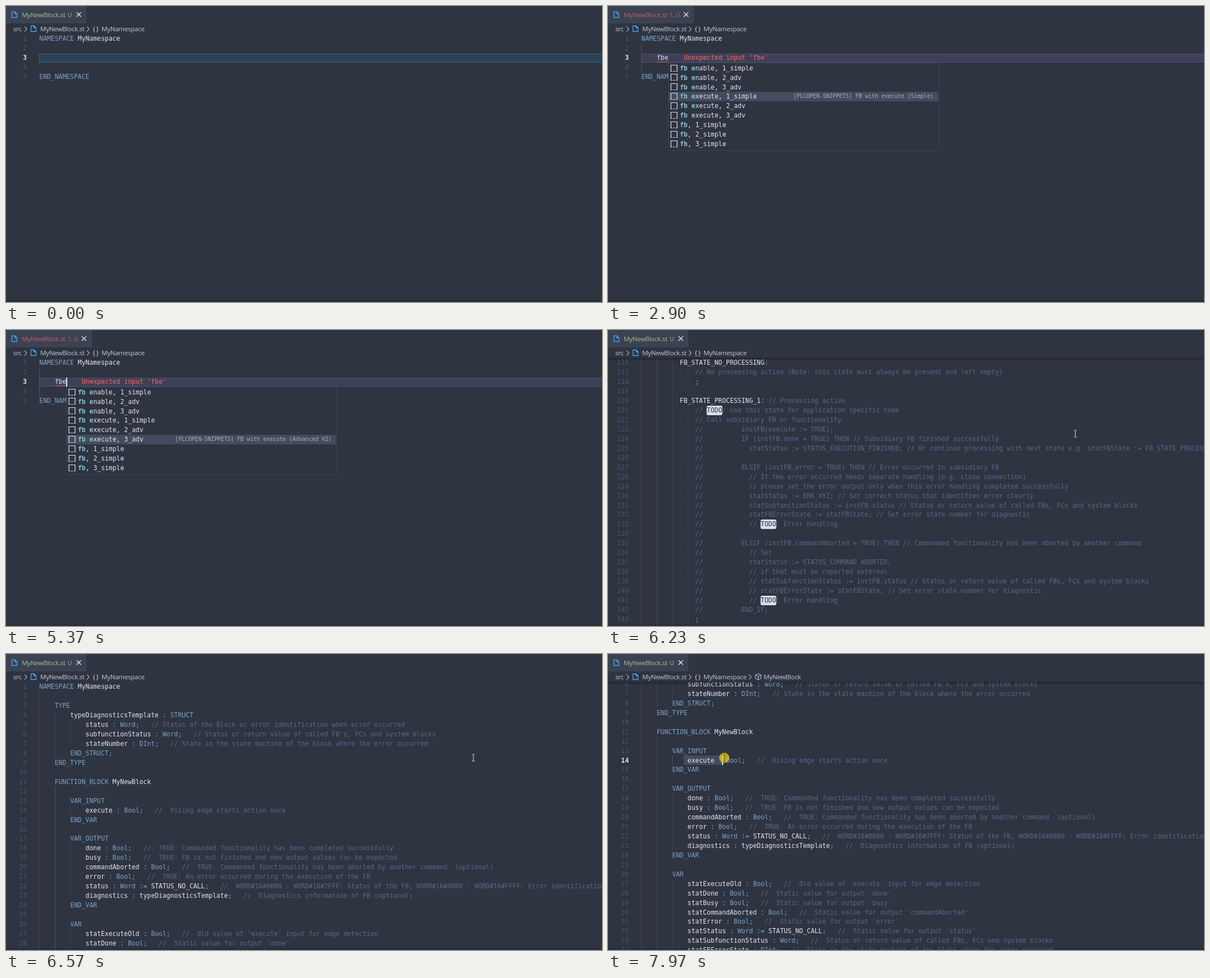
An HTML page with a canvas that plays this animation: 1061 px wide and 528 px high, repeating every 8000 ms.

```html
<!DOCTYPE html>
<html lang="en">
<head>
<meta charset="utf-8">
<title>Snippet completion</title>
<style>
html, body { margin: 0; width: 100%; height: 100%; overflow: hidden; background: #2e3440; }
canvas { display: block; }
</style>
</head>
<body>
<canvas id="stage" width="1061" height="528"></canvas>
<script>
const ctx = document.getElementById('stage').getContext('2d');
const W = 1061, H = 528, LOOP = 8000;
const LEFT = 59.3, TOP = 50, LINE = 16.94, CHAR = 6.857;
const MONO = '"DejaVu Sans Mono", monospace', UI = '"Open Sans", "Noto Sans", sans-serif';
const CODE = `11.39px ${MONO}`, BOLD = `bold ${CODE}`;
const C = {
  bg: '#2e3440', tab: '#3b4252', text: '#e2e7f0', key: '#7ca2c9', note: '#59678a', num: '#4a556d',
  guide: '#3d4454', active: '#4c566a', match: '#88c0d0', select: '#434c5e', ui: '#c3c9d5', icon: '#42a5f5'
};
const KEYWORDS = new Set(('NAMESPACE END_NAMESPACE TYPE END_TYPE STRUCT END_STRUCT FUNCTION_BLOCK END_FUNCTION_BLOCK ' +
  'VAR VAR_INPUT VAR_OUTPUT VAR_TEMP CONSTANT END_VAR IF THEN ELSE ELSIF END_IF CASE OF END_CASE AND OR NOT ' +
  'TRUE FALSE Word DInt Bool WORD').split(' '));

const head = `NAMESPACE MyNamespace

    TYPE
        typeDiagnosticsTemplate : STRUCT
            status : Word;   // Status of the Block or error identification when error occurred
            subfunctionStatus : Word;   // Status or return value of called FB's, FCs and system blocks
            stateNumber : DInt;   // State in the state machine of the block where the error occurred
        END_STRUCT;
    END_TYPE

    FUNCTION_BLOCK MyNewBlock

        VAR_INPUT
            execute : Bool;   //  Rising edge starts action once
        END_VAR

        VAR_OUTPUT
            done : Bool;   //  TRUE: Commanded functionality has been completed successfully
            busy : Bool;   //  TRUE: FB is not finished and new output values can be expected
            commandAborted : Bool;   //  TRUE: Commanded functionality has been aborted by another command  (optional)
            error : Bool;   //  TRUE: An error occurred during the execution of the FB
            status : Word := STATUS_NO_CALL;   //  WORD#16#0000 - WORD#16#7FFF: Status of the FB, WORD#16#8000 - WORD#16#FFFF: Error identification
            diagnostics : typeDiagnosticsTemplate;   //  Diagnostics information of FB (optional)
        END_VAR

        VAR
            statExecuteOld : Bool;   //  Old value of 'execute' input for edge detection
            statDone : Bool;   //  Static value for output 'done'
            statBusy : Bool;   //  Static value for output 'busy'
            statCommandAborted : Bool;   //  Static value for output 'commandAborted'
            statError : Bool;   //  Static value for output 'error'
            statStatus : Word := STATUS_NO_CALL;   //  Static value for output 'status'
            statSubfunctionStatus : Word;   //  Status or return value of called FBs, FCs and system blocks
            statFBErrorState : DInt;   //  State in the state machine of the block where the error occurred
            statFBState : DInt;   //  Current state of the state machine
            statDiagnostics : typeDiagnosticsTemplate;   //  Static value for output 'diagnostics'
        END_VAR

        VAR_TEMP
            tempExecute : Bool;   //  Temporary value of input 'execute'
        END_VAR

        VAR CONSTANT
            STATUS_EXECUTION_FINISHED : Word := WORD#16#0000;
            STATUS_NO_CALL : Word := WORD#16#7000;
            STATUS_FIRST_CALL : Word := WORD#16#7001;
            STATUS_SUBSEQUENT_CALL : Word := WORD#16#7002;
            STATUS_COMMAND_ABORTED : Word := WORD#16#8001;
            ERR_UNDEFINED_STATE : Word := WORD#16#8600;
            ERR_XYZ : Word := WORD#16#8601;
            FB_STATE_NO_PROCESSING : DInt := 0;
            FB_STATE_PROCESSING_1 : DInt := 1;
        END_VAR

        // Work with a temporary copy of the input
        tempExecute := execute;

        // Rising edge starts the processing
        IF (tempExecute = TRUE) AND (statExecuteOld = FALSE) THEN
            IF (statStatus = STATUS_NO_CALL) THEN
                // First call: initialize static values
                statDone := FALSE;
                statBusy := TRUE;
                statCommandAborted := FALSE;
                statError := FALSE;
                statStatus := STATUS_FIRST_CALL;
                statSubfunctionStatus := STATUS_EXECUTION_FINISHED;
                statFBErrorState := FB_STATE_NO_PROCESSING;
                statFBState := FB_STATE_PROCESSING_1;

                // Reset diagnostics
                statDiagnostics.status := STATUS_NO_CALL;
                statDiagnostics.stateNumber := FB_STATE_NO_PROCESSING;
            END_IF;

        ELSIF (statStatus = STATUS_FIRST_CALL) THEN
            // All further calls
            statStatus := STATUS_SUBSEQUENT_CALL;
        END_IF;

        // Falling edge resets the outputs
        IF (tempExecute = FALSE) AND (statBusy = FALSE) THEN
            statDone := FALSE;
            statError := FALSE;
            statCommandAborted := FALSE;
            statStatus := STATUS_NO_CALL;
            statFBState := FB_STATE_NO_PROCESSING;
        END_IF;

        statExecuteOld := tempExecute;

        // State machine
        CASE statFBState OF`.split('\n');

const tail = `          FB_STATE_NO_PROCESSING:
              // No processing active (Note: this state must always be present and left empty)
              ;

          FB_STATE_PROCESSING_1: // Processing active
              // TODO: Use this state for application specific code
              // Call subsidiary FB or functionality
              //          instFB(execute := TRUE);
              //          IF (instFB.done = TRUE) THEN // Subsidiary FB finished successfully
              //            statStatus := STATUS_EXECUTION_FINISHED; // Or continue processing with next state e.g. statFBState := FB_STATE_PROCESSING_2
              //
              //          ELSIF (instFB.error = TRUE) THEN // Error occurred in subsidiary FB
              //            // If the error occurred needs separate handling (e.g. close connection)
              //            // please set the error output only when this error handling completed successfully
              //            statStatus := ERR_XYZ; // Set correct status that identifies error clearly
              //            statSubfunctionStatus := instFB.status // Status or return value of called FBs, FCs and system blocks
              //            statFBErrorState := statFBState; // Set error state number for diagnostic
              //            // TODO: Error handling
              //
              //          ELSIF (instFB.commandAborted = TRUE) THEN // Commanded functionality has been aborted by another command
              //            // Set
              //            statStatus := STATUS_COMMAND_ABORTED;
              //            // if that must be reported external
              //            // statSubfunctionStatus := instFB.status // Status or return value of called FBs, FCs and system blocks
              //            // statFBErrorState := statFBState; // Set error state number for diagnostic
              //            // TODO: Error handling
              //          END_IF;
              ;

          ELSE // Undefined state
              statStatus := ERR_UNDEFINED_STATE;
              statFBErrorState := statFBState;
        END_CASE;

        // Write static values to outputs
        IF (statStatus = STATUS_EXECUTION_FINISHED) THEN
            statDone := TRUE;
            statBusy := FALSE;
        END_IF;

        done := statDone;
        busy := statBusy;
        commandAborted := statCommandAborted;
        error := statError;
        status := statStatus;
        diagnostics := statDiagnostics;

    END_FUNCTION_BLOCK

END_NAMESPACE`.split('\n');

const program = [...head, ...Array(115 - head.length).fill(''), ...tail];
const entries = ['fb enable, 1_simple', 'fb enable, 2_adv', 'fb enable, 3_adv', 'fb execute, 1_simple',
  'fb execute, 2_adv', 'fb execute, 3_adv', 'fb, 1_simple', 'fb, 2_simple', 'fb, 3_simple'];
const extra = ['for', 'function', 'function_block'];

// Timelines: [time, value], each value holds until the next
const TYPED = [[0, ''], [80, '    '], [160, '    f'], [320, '    fb'], [400, '    fbe']];
const CARET = [[0, 0], [80, 1], [880, 0], [1420, 1], [1900, 0], [2440, 1], [2900, 0],
  [3440, 1], [3900, 0], [4430, 1], [4890, 0], [5370, 1]];
const PICK = [[0, 0], [820, 1], [1620, 2], [2500, 3], [3360, 4], [4490, 5]];
const SCROLL = [[0, 140], [6110, 134], [6170, 125], [6230, 115], [6310, 92], [6370, 68], [6430, 44],
  [6510, 20], [6570, 0], [6770, 1.8], [6830, 4], [6970, 5.26]];
const POINTER = [[0, null], [6110, [832, 185]], [6770, [600, 195]], [6830, [330, 208]], [6970, null],
  [7110, [144.5, 216.5]], [7430, [141, 200]], [7497, [139, 191]]];
const at = (steps, t) => steps.findLast(s => s[0] <= t)[1];

function rect(x, y, w, h, color) {
  ctx.fillStyle = color;
  ctx.fillRect(x, y, w, h);
}
function text(str, x, y, color, font = CODE, align = 'left', spacing = 0) {
  ctx.font = font;
  ctx.fillStyle = color;
  ctx.textAlign = align;
  ctx.letterSpacing = spacing + 'px';
  ctx.fillText(str, x, y);
}
function path(d, x, y, color, width = 1.1) {
  ctx.save();
  ctx.translate(x, y);
  ctx.strokeStyle = color;
  ctx.lineWidth = width;
  ctx.stroke(new Path2D(d));
  ctx.restore();
}
const colX = col => LEFT + col * CHAR;
const label = (str, x, y, color, spacing = -.3) => text(str, x, y, color, `11.6px ${UI}`, 'left', spacing);
const fileIcon = (x, y) => path('M1 .5H6L9.5 4V10.5H.5V.5H6V4H9.5', x, y, C.icon, 1.3);
const chevron = x => path('M0 0L4 4.5L0 9', x, 36.5, C.ui);

function drawCode(line, y) {
  const cut = line.indexOf('//'), end = cut < 0 ? line.length : cut;
  for (const m of line.slice(0, end).matchAll(/\w+|[^\s\w]+/g)) {
    const blue = KEYWORDS.has(m[0]) || /^\W/.test(m[0]);
    text(m[0], colX(m.index), y, blue ? C.key : C.text);
  }
  if (cut < 0) return;
  text(line.slice(cut).replace('TODO', '    '), colX(cut), y, C.note);
  const todo = line.indexOf('TODO', cut);
  if (todo < 0) return;
  ctx.fillStyle = '#d8dee9';
  ctx.beginPath();
  ctx.roundRect(colX(todo) - .3, y - 12, 4 * CHAR + .6, 17, 3);
  ctx.fill();
  text('TODO', colX(todo), y, C.bg);
}

function drawLines(lines, scroll, activeLine, activeGuide) {
  const indent = i => lines[i] ? Math.max(0, lines[i].search(/\S|$/)) : 0;
  const depth = i => {
    if (lines[i]) return indent(i);
    let a = i, b = i;
    while (a > 0 && !lines[a]) a--;
    while (b < lines.length - 1 && !lines[b]) b++;
    return Math.max(indent(a), indent(b));
  };
  const first = Math.floor(scroll), last = Math.min(lines.length, first + 31);
  for (let i = first; i < last; i++) {
    const top = TOP + (i - scroll) * LINE, base = Math.round(top + 12.4);
    for (let c = 0; c < depth(i); c += 4)
      rect(Math.round(colX(c)), top, 1, LINE, activeGuide(i, c) ? C.active : C.guide);
    const on = i === activeLine;
    text(i + 1, 37, base, on ? C.text : C.num, on ? BOLD : CODE, 'right');
    drawCode(lines[i], base);
  }
}

function drawHeader(error, nested) {
  rect(0, 0, W, TOP, C.bg);
  rect(0, 0, error ? 153 : 143, 31, C.tab);
  const tint = error ? '#bf616a' : '#a3be8c';
  fileIcon(10, 10);
  label('MyNewBlock.st', 28, 20, tint, -.36);
  text(error ? '1, U' : 'U', 110, 20, tint, `10px ${UI}`);
  path('M0 0L8 8M8 0L0 8', error ? 135 : 125.5, 11.2, C.text, 1.3);

  label('src', 13, 45, C.ui);
  chevron(33);
  fileIcon(44, 35);
  label('MyNewBlock.st', 61, 45, C.ui, -.25);
  chevron(144);
  text('{}', 154.5, 44.5, C.text, `11px ${UI}`, 'left', 2);
  label('MyNamespace', 170, 45, C.ui);
  if (!nested) return;
  chevron(251);
  path('M5.5 0L10.5 2.5V8.5L5.5 11L.5 8.5V2.5ZM.5 2.5L5.5 5L10.5 2.5M5.5 5V11', 262, 35, '#b9b4dc');
  label('MyNewBlock', 277, 45, C.ui);
}

function drawPopup(t, query) {
  const list = t < 400 ? [...entries, ...extra] : entries, pick = at(PICK, t);
  const x = 107.5, y = 101.5, h = list.length * 16.9 + 4;
  rect(x, y, 481, h, C.bg);
  ctx.strokeStyle = '#3b4252';
  ctx.lineWidth = 1;
  ctx.strokeRect(x, y, 481, h);
  list.forEach((item, i) => {
    const top = 102.5 + i * 16.9, base = Math.round(top + 12.2);
    if (i === pick) rect(108, Math.round(top), 480, 17, C.select);
    path('M.5 11V.5H11.5V11', 111.5, Math.round(top) + 2, C.text, 1.2);
    path('M0 11.5H3M4.5 11.5H7.5M9 11.5H12', 111.5, Math.round(top) + 2, C.text, 1.2);
    let hit = 0;
    [...item].forEach((ch, c) => {
      const match = ch === query[hit];
      if (match) hit++;
      text(ch, 128 + c * CHAR, base, match ? C.match : C.text, match ? BOLD : CODE);
    });
    if (i === pick && i < 6) {
      const level = ['Simple', 'Advanced V1', 'Advanced V2'][i % 3];
      text(`[PLCOPEN-SNIPPETS] FB with ${i < 3 ? 'enable' : 'execute'} (${level})`,
        579.5, base - 1, '#a9b0be', `9.65px ${MONO}`, 'right');
    }
  });
}

function drawTyping(t) {
  const typed = at(TYPED, t), error = t >= 480;
  const fill = t < 80 ? '#2b415a' : error ? '#3e4058' : '#353c4a';
  rect(59, 85, W, 16, fill);
  ctx.strokeStyle = t < 80 ? '#3f5f7d' : '#4c5268';
  ctx.lineWidth = 1;
  ctx.strokeRect(59.5, 85.5, W, 15);
  drawLines(['NAMESPACE MyNamespace', '', typed, '', 'END_NAMESPACE'], 0, 2, () => true);
  if (error) {
    text("Unexpected input 'fbe'", 135, 96, '#ff6464');
    let d = 'M0 1';
    for (let i = 1; i <= 10; i++) d += `L${i * 2} ${i % 2 ? -1 : 1}`;
    path(d, 87, 99.5, '#e0525c', 1);
  }
  if (t >= 240) drawPopup(t, typed.trim());
  if (at(CARET, t)) rect(Math.round(colX(typed.length)), 85, 2, 16, C.text);
}

function drawProgram(t) {
  const scroll = at(SCROLL, t);
  const step = Math.floor((t - 7430) / 67.5), clicked = step >= 2;
  const drag = Math.min(1, (step - 2) / 6);
  const rowY = Math.round(TOP + (13 - scroll) * LINE), end = colX(Math.round(11 + 10 * drag));
  if (clicked && drag > 0) rect(colX(11), rowY, end - colX(11), 17, C.select);
  else if (clicked) rect(59, rowY, W, 17, '#353c4a');
  drawLines(program, scroll, clicked ? 13 : -1,
    (i, c) => clicked ? i === 13 && c === 8 : i > 10 && c === 4);
  if (clicked) rect(Math.round(end), rowY, 2, 17, C.text);
  if (scroll) {
    const shade = ctx.createLinearGradient(0, TOP, 0, TOP + 5);
    shade.addColorStop(0, 'rgba(0,0,0,.3)');
    shade.addColorStop(1, 'rgba(0,0,0,0)');
    rect(0, TOP, W, 5, shade);
  }
  const pointer = clicked ? [139 + 68 * drag, 185] : at(POINTER, t);
  if (!pointer) return;
  if (clicked) {
    ctx.fillStyle = 'rgba(226,205,20,.75)';
    ctx.beginPath();
    ctx.arc(...pointer, 9, 0, 7);
    ctx.fill();
  }
  path('M-2.5 -6H-.5L0 -5.5L.5 -6H2.5M0 -5.5V5.5M-2.5 6H-.5L0 5.5L.5 6H2.5', ...pointer, clicked ? '#776c10' : '#d8dee9', 1);
}

function draw(now) {
  const t = now % LOOP;
  rect(0, 0, W, H, C.bg);
  (t < 5710 ? drawTyping : drawProgram)(t);
  rect(0, 524, W, 4, 'rgba(0,0,0,.08)');
  drawHeader(t >= 480 && t < 6110, t >= 6770);
  requestAnimationFrame(draw);
}
requestAnimationFrame(draw);
</script>
</body>
</html>
```
